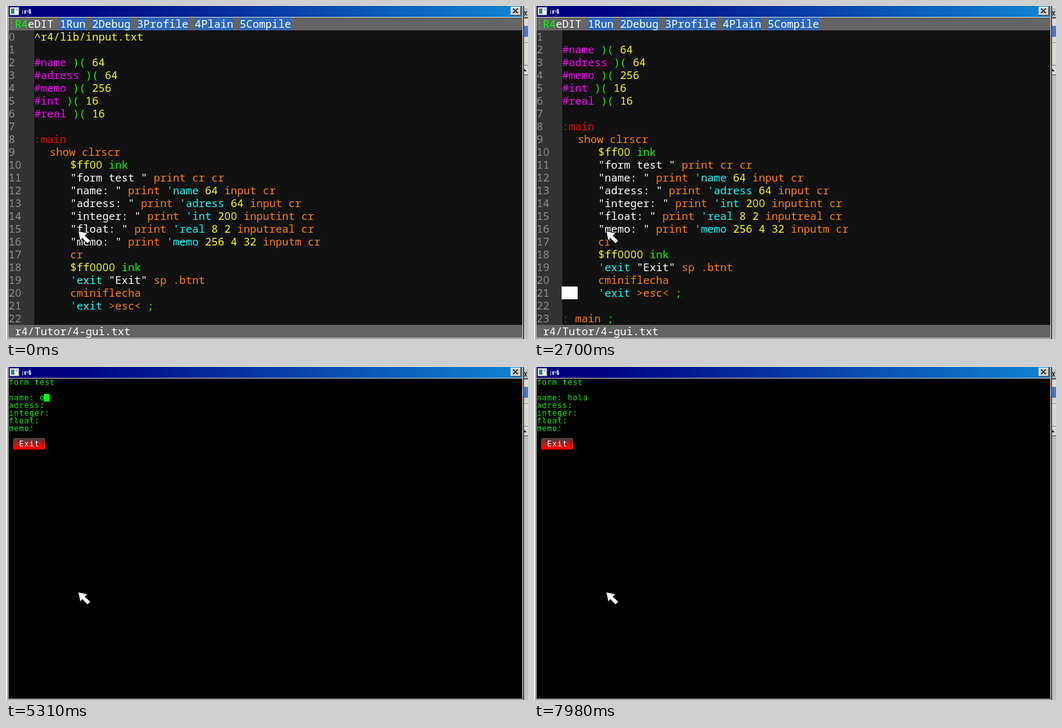
An HTML page for the animation above (8000 ms loop, 813 by 520 pixels).

```html
<!DOCTYPE html>
<html lang="en">
<head>
<meta charset="utf-8">
<title>r4 editor</title>
<style>
html, body { margin: 0; width: 100%; height: 100%; overflow: hidden; background: #000; }
svg { display: block; width: 813px; height: 520px; }
text { white-space: pre; }
.code { font: 16.667px "Noto Sans Mono", monospace; }
.zero { font-family: "Open Sans", sans-serif; }
.form { font: 11.6px "DejaVu Sans Mono", monospace; }
.title { font: bold 10px "DejaVu Serif", serif; }
</style>
</head>
<body>
<svg id="stage" viewBox="0 0 813 520" xmlns="http://www.w3.org/2000/svg">
  <defs>
    <linearGradient id="btn" x2="0" y2="1">
      <stop offset="0" stop-color="#484848"/>
      <stop offset=".25" stop-color="#702c2c"/>
      <stop offset=".7" stop-color="#f00808"/>
      <stop offset="1" stop-color="#f00"/>
    </linearGradient>
    <clipPath id="view"><rect x="4" y="38" width="800" height="460"/></clipPath>
  </defs>
  <g id="frame"></g>
  <g id="editor">
    <g id="chrome"></g>
    <g clip-path="url(#view)">
      <rect id="caret" fill="#fff" height="20"/>
      <g id="lines"></g>
    </g>
  </g>
  <g id="form"></g>
  <path d="M113 352L126.500 355L122.500 358.500L131 366.500L127 370.500L118.800 362.300L115.800 366Z" fill="#fff" stroke="#111" stroke-width="2" paint-order="stroke"/>
</svg>
<script>
const NS = 'http://www.w3.org/2000/svg';
const $ = id => document.getElementById(id);
const LOOP = 8000;

function add(parent, tag, attrs, content) {
  const el = document.createElementNS(NS, tag);
  for (const k in attrs) el.setAttribute(k, attrs[k]);
  if (content !== undefined) el.textContent = content;
  parent.appendChild(el);
  return el;
}
const rect = (g, x, y, width, height, fill, more) =>
  add(g, 'rect', { x, y, width, height, fill, ...more });

// Editor text sits on a 10px grid and has plain zeros.
function code(g, str, x, y, fill) {
  const xs = [...str].map((c, i) => x + i * 10 + (c === '0' ? .25 : 0)).join(' ');
  const el = add(g, 'text', { x: xs, y: y + 16, fill, class: 'code' });
  for (const part of str.split(/(0+)/)) {
    if (part) add(el, 'tspan', part[0] === '0' ? { class: 'zero' } : {}, part);
  }
}

// Form text sits on an 8px grid.
const cells = str => [...str].map((c, i) => i * 8 + .5).join(' ');
const small = (g, str, x, y, fill) =>
  add(g, 'text', { x: cells(str), y: 10, transform: `translate(${x} ${y})`, fill, class: 'form' }, str);

function drawFrame(g) {
  rect(g, 0, 0, 813, 520, '#d4d0c8');
  rect(g, 0, 0, 2, 520, '#f4f4f4');
  rect(g, 2, 0, 1, 520, '#808080');
  rect(g, 3, 0, 1, 520, '#d4d0c8');
  for (let i = 0; i < 57; i++) {
    const k = Math.max(0, (i - 6) / 50), x = 4 + i * 14.1;
    rect(g, Math.round(x), 0, 15, 17, `rgb(${16 * k},${132 * k},${128 + 80 * k})`);
  }
  rect(g, 4, 17, 801, 1, '#d4d0c8');
  rect(g, 6, 2, 14, 12, '#f4f4f4', { stroke: '#888', 'stroke-width': 1 });
  rect(g, 8, 4, 5, 8, '#2c8468');
  rect(g, 15, 4, 3, 3, '#b0c4d4');
  add(g, 'text', { x: 24, y: 12, fill: '#fff', class: 'title' }, ':r4');
  rect(g, 786, 1, 16, 14, '#404040');
  rect(g, 786, 1, 15, 13, '#fff');
  rect(g, 787, 2, 14, 12, '#d4d0c8');
  add(g, 'path', { d: 'M790 4l7 7m0-7l-7 7', stroke: '#000', 'stroke-width': 1.6 });
  rect(g, 804, 0, 1, 520, '#d4d0c8');
  rect(g, 805, 0, 2, 520, '#505050');
  // sliver of the window behind
  rect(g, 807, 0, 6, 108, '#dcd9d2');
  rect(g, 807, 3, 6, 15, '#c4c0b8');
  add(g, 'path', { d: 'M807 8l4 7m0-7l-4 7M807 18.500h6', stroke: '#222', 'stroke-width': 1.4 });
  rect(g, 807, 31, 6, 17, '#3c78d8');
  rect(g, 807, 57, 6, 1, '#808080');
  rect(g, 807, 58, 6, 1, '#fff');
  add(g, 'path', { d: 'M807 98l4 4h-4z', fill: '#000' });
  rect(g, 807, 92, 6, 1, '#808080');
  rect(g, 807, 107, 6, 1, '#404040');
  rect(g, 807, 108, 6, 412, '#c0c0c0');
  rect(g, 3, 518, 802, 1, '#d4d0c8');
  rect(g, 3, 519, 802, 1, '#808080');
}

const SOURCE = `^r4/lib/input.txt

#name )( 64
#adress )( 64
#memo )( 256
#int )( 16
#real )( 16

:main
\tshow clrscr
\t\t$ff00 ink
\t\t"form test " print cr cr
\t\t"name: " print 'name 64 input cr
\t\t"adress: " print 'adress 64 input cr
\t\t"integer: " print 'int 200 inputint cr
\t\t"float: " print 'real 8 2 inputreal cr
\t\t"memo: " print 'memo 256 4 32 inputm cr
\t\tcr
\t\t$ff0000 ink
\t\t'exit "Exit" sp .btnt
\t\tcminiflecha
\t\t'exit >esc< ;

: main ;`.split('\n');

const INK = { '#': '#f0f', ':': '#f00', '"': '#fff', "'": '#0ff', '$': '#ff0', '^': '#ff0' };
function tint(word) {
  if (/^(ink|\)\(|;)$/.test(word)) return '#0f0';
  return INK[word[0]] || (/^\d/.test(word) ? '#ff0' : '#ff8000');
}

function drawEditor(chrome, lines) {
  rect(chrome, 4, 18, 800, 500, '#111');
  rect(chrome, 4, 38, 40, 460, '#323232');
  rect(chrome, 4, 18, 800, 20, '#646464');
  rect(chrome, 4, 498, 800, 20, '#646464');
  code(chrome, ':R4', 4, 18, '#0f0');
  code(chrome, 'eDIT', 34, 18, '#fff');
  let x = 84;
  for (const item of ['1Run', '2Debug', '3Profile', '4Plain', '5Compile']) {
    rect(chrome, x, 18, item.length * 10, 20, '#3067b8');
    code(chrome, item, x, 18, '#fff');
    x += item.length * 10 + 10;
  }
  code(chrome, 'r4/Tutor/4-gui.txt', 14, 498, '#fff');
  SOURCE.forEach((line, n) => {
    const y = 38 + n * 20, tabs = line.match(/^\t*/)[0].length;
    const left = tabs ? 36 + tabs * 32 : 44;
    code(lines, String(n), 4, y, '#909090');
    for (const m of line.slice(tabs).matchAll(/"[^"]*"|\S+/g)) {
      code(lines, m[0], left + m.index * 10, y, tint(m[0]));
    }
  });
}

function drawForm(g) {
  rect(g, 4, 18, 800, 500, '#000');
  ['form test', '', 'name:', 'adress:', 'integer:', 'float:', 'memo:']
    .forEach((s, i) => s && small(g, s, 4, 18 + i * 12, '#0f0'));
  rect(g, 11, 111, 50, 18, 'url(#btn)', { rx: 2 });
  small(g, 'Exit', 20, 114, '#fff');
}

drawFrame($('frame'));
drawEditor($('chrome'), $('lines'));
drawForm($('form'));
const entry = small($('form'), '', 52, 42, '#0f0');
const block = rect($('form'), 51, 42, 9, 12, '#0f0');

// [x, y, width] of the editor caret
const HASH = [43, 158, 11], SEMI = [113, 478, 11], TAB = [43, 438, 25];
const carets = [[0], [270, HASH], [430], [720, HASH], [850, SEMI], [1000], [1280, SEMI], [1400],
  [1700, TAB], [1960], [2260, TAB], [2540], [2700, TAB]];
const SCROLL_AT = 850, FORM_AT = 2850;

// [time, typed text, caret shown]
const typing = [[2850, '', 1], [3000, '', 0], [3160, '', 1], [3560, '', 0], [3820, '', 1], [3960, '', 0],
  [4270, '', 1], [4420, '', 0], [4720, '', 1], [4860, 'o', 1], [5000, '', 0], [5310, 'o', 1], [5460, 'o', 0],
  [5740, '', 1], [6020, '', 0], [6320, '', 1], [6450, '', 0], [6730, 'h', 1], [7000, 'ho', 0],
  [7280, 'hol', 1], [7420, 'hol', 0], [7560, 'hola', 0], [7700, 'hola', 1], [7980, 'hola', 0]];

const current = (steps, t) => steps.findLast(s => s[0] <= t);
const show = (el, on) => el.setAttribute('visibility', on ? 'visible' : 'hidden');

function render(t) {
  const inForm = t >= FORM_AT;
  $('editor').style.display = inForm ? 'none' : '';
  $('form').style.display = inForm ? '' : 'none';
  if (inForm) {
    const [, text, on] = current(typing, t);
    entry.textContent = text;
    entry.setAttribute('x', cells(text));
    block.setAttribute('x', 51 + text.length * 8);
    show(block, on);
  } else {
    const spot = current(carets, t)[1];
    $('lines').setAttribute('transform', `translate(0 ${t >= SCROLL_AT ? -20 : 0})`);
    show($('caret'), spot);
    if (spot) ['x', 'y', 'width'].forEach((k, i) => $('caret').setAttribute(k, spot[i]));
  }
}

const start = performance.now();
function tick() {
  render((performance.now() - start) % LOOP);
  requestAnimationFrame(tick);
}
tick();
</script>
</body>
</html>
```
